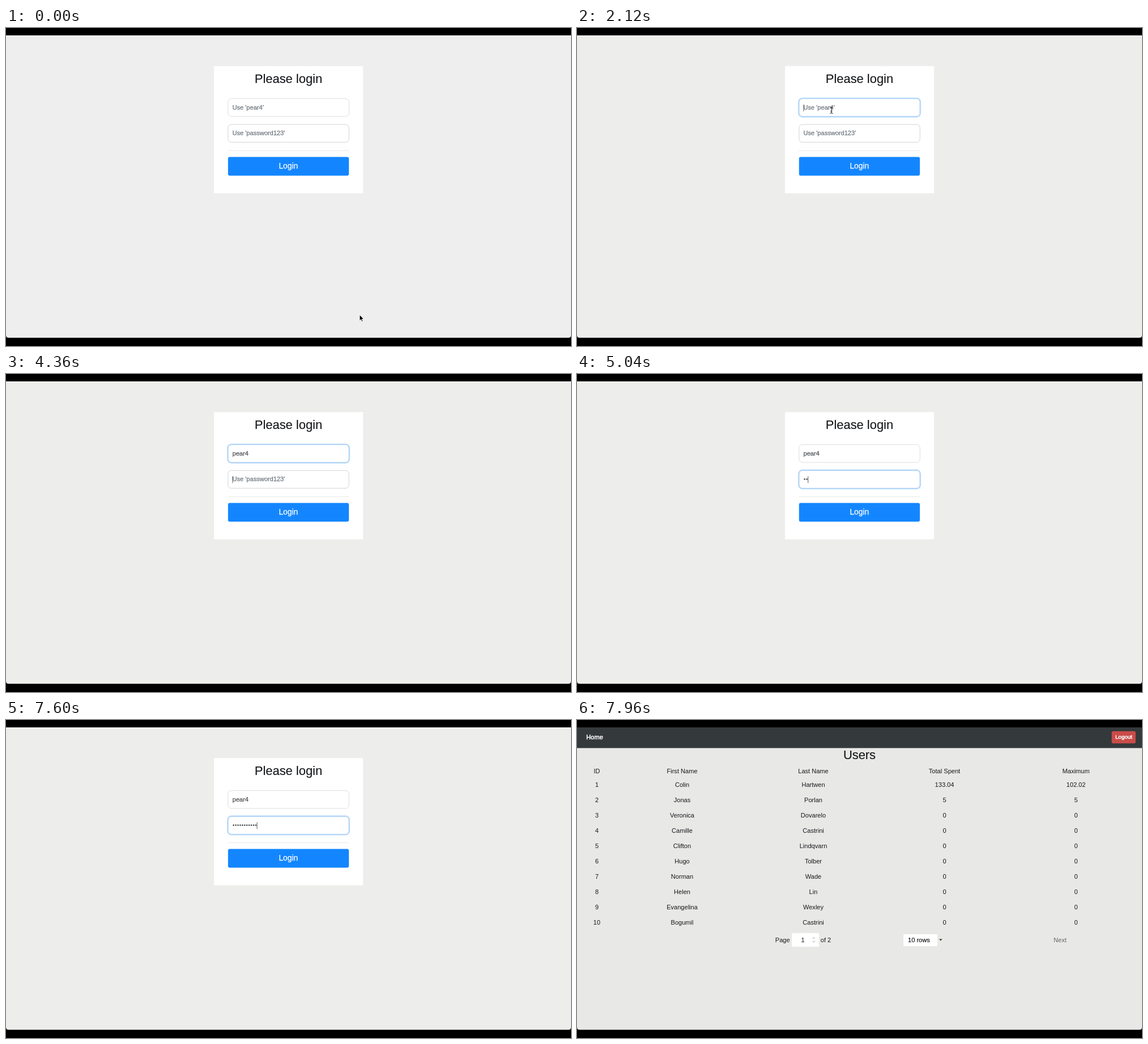
An HTML page for the animation above (8000 ms loop, 997 by 561 pixels).

```html
<!DOCTYPE html>
<html lang="en">
<head>
<meta charset="utf-8">
<title>Login</title>
<style>
html, body { margin: 0; width: 100%; height: 100%; overflow: hidden; background: #000; }
svg { display: block; width: 997px; height: 561px; }
text { font-family: "Liberation Sans", Arial, sans-serif; font-size: 11.07px; fill: #16191c; white-space: pre; }
.mid { text-anchor: middle; }
.title { font-size: 21.9px; stroke: #16191c; stroke-width: .15px; }
.hint { fill: #6c757d; stroke: #6c757d; stroke-width: .25px; }
.typed { fill: #43484d; stroke: #43484d; stroke-width: .2px; }
.firm { fill: #fff; stroke: #fff; stroke-width: .5px; }
</style>
</head>
<body>
<svg viewBox="0 0 997 561">
  <defs>
    <g id="ring" fill="none">
      <rect x="390.9" y="123.7" width="215.2" height="33.2" rx="7" stroke="#c3dffb" stroke-width="2"/>
      <rect x="391.8" y="124.6" width="213.4" height="31.4" rx="6" stroke="#a2cdf8"/>
    </g>
  </defs>
  <rect width="997" height="561"/>
  <path id="back" d="M0 13H997V542Q997 546.6 992 546.6H5Q0 546.6 0 542Z" fill="#eee"/>

  <g id="login">
    <rect x="367" y="67.2" width="263" height="224.4" fill="#fff"/>
    <text class="mid title" x="498.5" y="96.8">Please login</text>
    <rect x="391.8" y="124.6" width="213.4" height="31.4" rx="6" fill="#fff" stroke="#dadde1"/>
    <rect x="391.8" y="170.2" width="213.4" height="31.4" rx="6" fill="#fff" stroke="#d0d4d9"/>
    <use id="ring1" href="#ring"/>
    <use id="ring2" href="#ring" y="45.6"/>
    <text id="hint1" class="hint" x="399.5" y="143.8">Use 'pear4'</text>
    <text id="hint2" class="hint" x="399.5" y="189.3">Use 'password123'</text>
    <text id="name" class="typed" x="399.5" y="143.8"></text>
    <g id="dots" fill="#43484d"></g>
    <path id="caret" d="M0 0V12" stroke="#333" stroke-width=".8"/>
    <path d="M391.5 216.5H605" stroke="#000" stroke-opacity=".09"/>
    <rect id="button" x="391.8" y="227.5" width="213.2" height="33" rx="3"/>
    <text class="mid" x="498.3" y="248.3" style="font-size:13.8px;fill:#fff;stroke:#fff;stroke-width:.25px">Login</text>
  </g>

  <g id="users">
    <rect y="13" width="997" height="36.5" fill="#34393c"/>
    <text class="firm" x="16.3" y="34">Home</text>
    <rect x="943.5" y="19.8" width="42.2" height="21.4" rx="2.5" fill="#ca4c49"/>
    <text class="firm mid" x="964.8" y="33.4" style="font-size:9.7px">Logout</text>
    <text class="mid title" x="498.5" y="68.9">Users</text>
    <g id="table"></g>
    <text x="349.8" y="391.5">Page</text>
    <rect x="379" y="376" width="48" height="24" rx="1.5" fill="#fff"/>
    <text class="mid" x="398.5" y="391.5">1</text>
    <path d="M415.8 386L417.8 383.4 419.8 386M415.8 389.5L417.8 392.1 419.8 389.5" fill="none" stroke="#999" stroke-width=".8"/>
    <text x="429.8" y="391.5">of 2</text>
    <rect x="576" y="378" width="60" height="21" rx="1.5" fill="#fff"/>
    <text x="584" y="391.5" style="stroke:#16191c;stroke-width:.2px">10 rows</text>
    <path d="M639 386.4H644.6L641.8 389.2Z" fill="#222"/>
    <text x="841" y="391.5" style="fill:#666">Next</text>
  </g>

  <g id="pointer">
    <path id="arrow" d="M0 0V10.4L2.4 8.2 4 11.9 5.7 11.2 4.2 7.5H7.3Z" stroke="#fff" stroke-width=".8"/>
    <path id="hand" d="M-1.8 .6Q-1 -.8 0 .6L1.1 3.6 2.6 3.2 4.1 3.6 5.6 4.4 6 6.6 5.4 8.2V10.4H.2L-1.4 8 -3.2 6.2Q-3 4.9 -1.6 5.6L-.6 6.2Z" fill="#fff" stroke="#000"/>
    <path id="beam" d="M-2.5 -5.6Q0 -5.6 0 -4.2Q0 -5.6 2.5 -5.6M0 -4.2V4.2M-2.5 5.6Q0 5.6 0 4.2Q0 5.6 2.5 5.6M-1.4 1.8H1.4" fill="none" stroke="#111"/>
  </g>
</svg>
<script>
const LOOP = 8000, STEP = 40;
const $ = id => document.getElementById(id);
const show = (id, on) => { $(id).style.display = on ? "" : "none"; };
const ramp = (t, from, len) => Math.min(1, Math.max(0, (t - from) / len));
const smooth = k => k * k * (3 - 2 * k);
const within = (t, spans) => spans.some(([a, b]) => t >= a && t < b);
const count = (t, times) => times.filter(at => t >= at).length;

function add(parent, tag, attrs, text = "") {
  const el = document.createElementNS("http://www.w3.org/2000/svg", tag);
  for (const key in attrs) el.setAttribute(key, attrs[key]);
  el.textContent = text;
  parent.append(el);
}

const people = `Colin Hartwen 133.04 102.02
Jonas Porlan 5 5
Veronica Dovarelo 0 0
Camille Castrini 0 0
Clifton Lindqvarn 0 0
Hugo Tolber 0 0
Norman Wade 0 0
Helen Lin 0 0
Evangelina Wexley 0 0
Bogumil Castrini 0 0`.split("\n").map((line, i) => [i + 1, ...line.split(" ")]);
const columns = [35, 185.5, 417, 648.5, 880.5];
const row = (cells, y) => cells.forEach((cell, i) =>
  add($("table"), "text", { class: "mid", x: columns[i], y }, cell));
row(["ID", "First Name", "Last Name", "Total Spent", "Maximum"], 94.3);
people.forEach((person, i) => row(person, 117.5 + 27 * i));

const DOT = 3.92;
for (let i = 0; i < 11; i++) add($("dots"), "circle", { cx: 401.6 + DOT * i, cy: 185.6, r: 1.3 });

// time, x, y of the pointer's hot spot
const path = [
  [440, 624, 506], [560, 572, 408], [640, 509, 284], [720, 481, 244],
  [800, 473, 231], [960, 463, 204], [1120, 453, 160], [1240, 449, 145]
];
const nameKeys = [3080, 3400, 3720, 3960, 4120];
const passKeys = [4800, 5000, 5240, 5480, 5640, 5760, 5960, 6320, 6480, 6680, 6920];
const caretOn = [[1320, 1560], [2120, 2640], [3080, 7080], [7600, 7720]];
const CLICK = 1280, TAB = 4360, OPEN = 7720, FADE = 200;

function place(t) {
  if (t <= path[0][0]) return path[0].slice(1);
  const i = path.findIndex(p => p[0] > t);
  if (i < 0) return path[path.length - 1].slice(1);
  const [t0, x0, y0] = path[i - 1], [t1, x1, y1] = path[i];
  const k = (t - t0) / (t1 - t0);
  return [x0 + (x1 - x0) * k, y0 + (y1 - y0) * k];
}

function drawPointer(t) {
  const [x, y] = place(t);
  const inBox = x > 391 && x < 606;
  const onButton = inBox && y > 227 && y < 261;
  const onField = inBox && (y > 124 && y < 157 || y > 170 && y < 202);
  $("pointer").setAttribute("transform", `translate(${x} ${y})`);
  show("pointer", t < nameKeys[0]);
  show("hand", onButton);
  show("beam", onField);
  show("arrow", !onButton && !onField);
}

function drawButton(t) {
  const hover = smooth(ramp(t, 640, 150)) * (1 - smooth(ramp(t, 830, 150)));
  const mix = (a, b) => Math.round(a + (b - a) * hover);
  $("button").setAttribute("fill", `rgb(${mix(19, 12)},${mix(134, 116)},${mix(255, 219)})`);
}

function drawFields(t) {
  const swap = smooth(ramp(t, TAB, FADE));
  $("ring1").setAttribute("opacity", smooth(ramp(t, CLICK, FADE)) * (1 - swap));
  $("ring2").setAttribute("opacity", swap);

  const letters = count(t, nameKeys), dots = count(t, passKeys);
  $("name").textContent = "pear4".slice(0, letters);
  show("hint1", !letters);
  show("hint2", !dots);
  [...$("dots").children].forEach((dot, i) => { dot.style.display = i < dots ? "" : "none"; });

  const second = t >= TAB;
  const caretX = second ? 399.9 + DOT * dots
    : 400 + (letters ? $("name").getComputedTextLength() : 0);
  $("caret").setAttribute("transform", `translate(${caretX} ${second ? 180.3 : 135})`);
  show("caret", within(t, caretOn));
}

function draw(now) {
  const t = Math.floor(now % LOOP / STEP) * STEP;
  const opened = t >= OPEN;
  show("login", !opened);
  show("users", opened);
  $("back").setAttribute("fill", opened ? "#e8e8e6" : t < 480 ? "#eee" : "#ededeb");
  drawPointer(t);
  drawButton(t);
  drawFields(t);
}

const start = performance.now();
function tick() {
  draw(performance.now() - start);
  requestAnimationFrame(tick);
}
tick();
</script>
</body>
</html>
```
